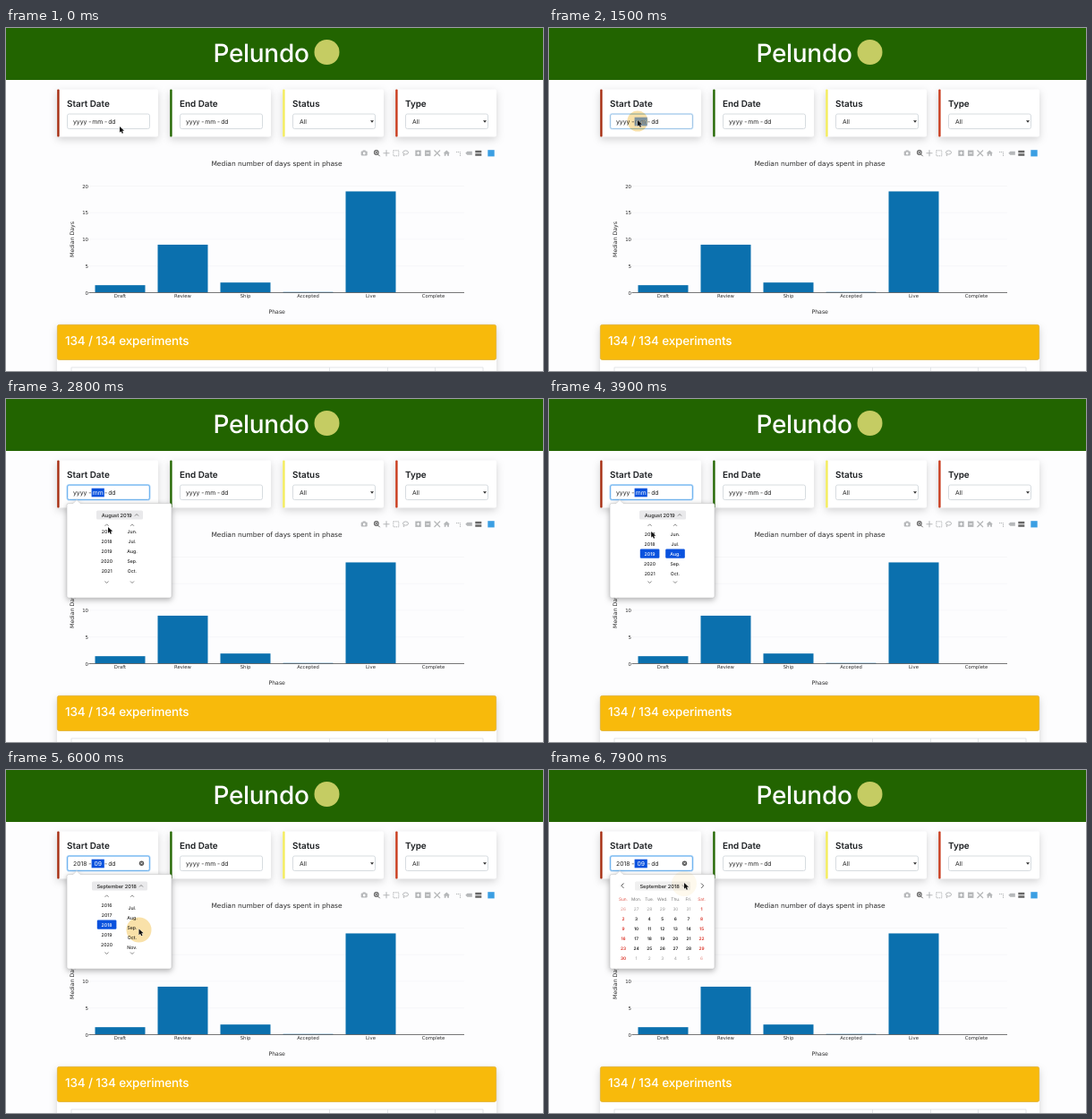
Write an HTML page that moves like this. It is 600 by 383 pixels and loops after 8 s.

```html
<!DOCTYPE html>
<html lang="en">
<head>
<meta charset="utf-8">
<title>Experiment dashboard</title>
<style>
html, body { margin: 0; width: 100%; height: 100%; overflow: hidden; background: #fdfdfe; }
svg { display: block; text-rendering: geometricPrecision; }
text { font-family: Inter, Roboto, sans-serif; white-space: pre; }
.plot text { font-family: "DejaVu Sans", Verdana, sans-serif; }
.card { filter: drop-shadow(0 3px 4px rgba(0,0,0,.17)); }
.popup { filter: drop-shadow(0 2px 3px rgba(0,0,0,.3)); }
</style>
</head>
<body>
<svg width="600" height="383" viewBox="0 0 600 383">
  <g id="page"></g>
  <g id="live"></g>
</svg>
<script>
const LOOP = 8000;
const BLUE = '#0a52de';
const $ = id => document.getElementById(id);

const rect = (x, y, w, h, fill, more = '') =>
  `<rect x="${x}" y="${y}" width="${w}" height="${h}" fill="${fill}" ${more}/>`;
const line = (d, stroke, width = 1, more = '') =>
  `<path d="${d}" fill="none" stroke="${stroke}" stroke-width="${width}" ${more}/>`;
const text = (s, x, y, size, fill = '#222', more = '') =>
  `<text x="${x}" y="${y}" font-size="${size}" fill="${fill}" ${more}>${s}</text>`;
const MID = 'text-anchor="middle"';
const END = 'text-anchor="end"';

function dateText(x, year) {
  return text(year, x, 106.8, 6.8) + text('-', x + 17.2, 106.8, 6.8) +
    text('mm', x + 21.2, 106.8, 6.8) +
    text('-', x + 35, 106.8, 6.8) + text('dd', x + 39.2, 106.8, 6.8);
}

function filterCard(label, color, i) {
  const x = 57 + i * 126;
  let s = `<g class="card">${rect(x, 68.5, 113, 53, '#fff', 'rx="2"')}</g>` +
    rect(x + .2, 68.5, 2.4, 53, color, 'rx="1"') +
    text(label, x + 11, 88, 9.9, '#1b1e21', 'font-weight="600"') +
    rect(x + 11.5, 96, 92, 16.5, '#fff', 'rx="2" stroke="#cdd3d9" stroke-width=".8"');
  if (i === 1) s += dateText(x + 18, 'yyyy');
  if (i > 1) s += text('All', x + 19, 106.8, 6.8) +
    `<path d="M${x + 98} 103.2h4l-2 2.6z" fill="#333"/>`;
  return s;
}

function toolbar() {
  const c = '#b5b7b9', dark = '#666';
  return rect(396.7, 137.5, 7, 5, c, 'rx="1"') + rect(398.7, 136.5, 3, 2, c) +
    '<circle cx="400.2" cy="140" r="1.4" fill="#fff"/>' +
    `<circle cx="413.8" cy="139" r="2.3" fill="none" stroke="${dark}" stroke-width="1.2"/>` +
    line('M415.5 141l2.2 2.2M412.6 139h2.4M413.8 137.8v2.4', dark) +
    line('M421.5 139.8h7M425 136.3v7', c, 1.1) +
    rect(432.8, 136.8, 6, 6, 'none', `stroke="${c}" stroke-dasharray="1.5 .8"`) +
    `<ellipse cx="446.5" cy="139" rx="3" ry="2.1" fill="none" stroke="${c}"/>` +
    line('M444.5 140.5q-1 1.5 .5 2.5', c) +
    rect(457.3, 136.5, 6.4, 6.4, c) + line('M458.8 139.7h3.4M460.5 138v3.4', '#fff') +
    rect(468, 136.5, 6.4, 6.4, c) + line('M469.5 139.7h3.4', '#fff') +
    line('M478.5 136.5l6.5 6.5M485 136.5l-6.5 6.5', c, 1.2) +
    `<path d="M488.7 139.8l3.6-3.4 3.6 3.4h-1v3h-1.8v-2h-1.6v2h-1.8v-3z" fill="${c}"/>` +
    line('M503 138.5h4.5v4.5', c, 1, 'stroke-dasharray="1.3 .7"') +
    `<path d="M513.3 139.8l2-2h5.5v4h-5.5z" fill="${c}"/>` +
    rect(524.3, 136.8, 7, 2.5, dark) + rect(524.3, 140.3, 7, 2.5, dark) +
    rect(538.3, 136.2, 7.4, 7.2, '#3b9fe3');
}

function chart() {
  const base = 295.5, unit = 5.95;
  let s = text('Median number of days spent in phase', 302.5, 154.3, 7.5, '#2a2a2a', MID);
  for (let v = 0; v <= 20; v += 5) {
    const y = base - v * unit;
    if (v) s += line(`M92 ${y}H512`, '#f4f4f5', .6);
    s += text(v, 92, y + 2, 5.4, '#2a2a2a', END);
  }
  const phases = { Draft: 1.4, Review: 9, Ship: 1.9, Accepted: .12, Live: 19, Complete: 0 };
  Object.entries(phases).forEach(([name, days], i) => {
    const x = 127.5 + i * 70;
    s += rect(x - 28, base - days * unit, 56, days * unit, '#0b70ae') +
      text(name, x, 301.4, 5.3, '#2a2a2a', MID);
  });
  s += line(`M92.5 ${base}H512`, '#555', .8) + text('Phase', 302.7, 318.8, 6.2, '#2a2a2a', MID) +
    text('Median Days', 0, 0, 6.2, '#2a2a2a', `${MID} transform="translate(76 236) rotate(-90)"`);
  return `<g class="plot">${s}</g>`;
}

function page() {
  const cards = [['Start Date', '#a52c10'], ['End Date', '#226600'],
    ['Status', '#f3ec5c'], ['Type', '#c93c1d']];
  return rect(0, 0, 600, 383, '#fdfdfe') + rect(0, 0, 600, 58, '#226400') +
    text('Pelundo', 285, 38, 28, '#fff', MID + ' font-weight="500" letter-spacing="-.3"') +
    '<circle cx="358.5" cy="27" r="14" fill="#c5cc63"/>' +
    cards.map(([label, color], i) => filterCard(label, color, i)).join('') +
    toolbar() + chart() +
    `<g class="card">${rect(57, 331.5, 491, 60, '#fff', 'rx="2"')}</g>` +
    rect(57.4, 331.4, 490.2, 39, '#f8ba0b', 'rx="2" stroke="#dfae2c" stroke-width=".8"') +
    text('134 / 134 experiments', 66, 354.2, 13.5, '#fff', 'font-weight="500" letter-spacing="-.15"') +
    line('M73 384V379H533V384M361.5 379v5M426.5 379v5M479.5 379v5', '#dcdfe2', .8);
}

// Cursor keys: time, x, y
const path = [[0, 127, 110], [300, 127, 110], [1200, 99, 103], [1750, 99, 103],
  [2250, 124, 129], [2450, 124, 129], [2800, 114, 143], [3500, 114, 143],
  [4400, 114.5, 155], [5000, 114.5, 155], [5650, 148.5, 177.5], [6250, 148.5, 177.5],
  [7200, 150.5, 125.5], [LOOP, 151, 126]];
const clicks = [1400, 2350, 4700, 5800, 7500];

const clamp = v => Math.max(0, Math.min(1, v));
const ramp = (t, a, b) => clamp((t - a) / (b - a));
const smooth = k => k * k * (3 - 2 * k);

function cursorAt(t) {
  const i = path.findIndex(p => p[0] > t);
  const [t0, x0, y0] = path[i - 1], [t1, x1, y1] = path[i];
  const k = smooth(ramp(t, t0, t1));
  return [x0 + (x1 - x0) * k, y0 + (y1 - y0) * k];
}

function pointer(t) {
  const [x, y] = cursorAt(t);
  let s = '';
  for (const c of clicks) {
    if (t < c || t > c + 450) continue;
    const r = 9 + 5 * ramp(t, c, c + 200);
    s += `<circle cx="${x}" cy="${y + 1}" r="${r}" fill="#f8dc9a" ` +
      `opacity="${.85 * (1 - ramp(t, c + 220, c + 450))}" style="mix-blend-mode:multiply"/>`;
  }
  return s + `<path transform="translate(${x} ${y})" d="M0 0v6.8l1.6-1.5 1.1 2.5 1.3-.6-1.1-2.4h2.2z" ` +
    'fill="#111" stroke="#fff" stroke-width=".6" paint-order="stroke"/>';
}

const monthName = (m, style) => new Date(2018, m, 1).toLocaleString('en-US', { month: style });

function heading(year, month, open) {
  const label = `${monthName(month, 'long')} ${year}`;
  const half = month === 8 ? 31 : 26;
  const x = 127 + half - 7;
  return rect(127 - half, 124.4, half * 2, 10, open ? '#e9e9eb' : '#f0f0f0', 'rx="1.5"') +
    text(label, 123.7, 131.5, 5.7, '#222', MID + ' font-weight="500"') +
    line(open ? `M${x - 2} 130.5l2-2 2 2` : `M${x - 2} 128.5l2 2 2-2`, '#666', .8);
}

function calendar(year, month) {
  let s = line('M83.5 126.5l-2.7 2.7 2.7 2.7M170 126.5l2.7 2.7-2.7 2.7', '#444', .9);
  const first = new Date(year, month, 1).getDay();
  for (let i = 0; i < 49; i++) {
    const col = i % 7, row = Math.floor(i / 7);
    const x = 83 + col * 14.6, y = 145.6 + row * 11.1;
    const red = col % 6 === 0;
    if (!row) {
      const day = ['Sun', 'Mon', 'Tue', 'Wed', 'Thu', 'Fri', 'Sat'][col];
      s += text(day + '.', x, y, 4.8, red ? '#e2574c' : '#777', MID);
      continue;
    }
    const date = new Date(year, month, i - 6 - first);
    const inside = date.getMonth() === month;
    const fill = red ? (inside ? '#d9281c' : '#e58a82') : (inside ? '#222' : '#999');
    s += text(date.getDate(), x, y, 4.8, fill, `${MID} font-weight="${inside ? 600 : 400}"`);
  }
  return s;
}

function spinner(x, labels, shift) {
  const settled = Math.abs(shift) < .1;
  let s = line(`M${x - 2} 141.8l2-2 2 2M${x - 2} 203.5l2 2 2-2`, '#777', .9);
  if (settled) s += rect(x - 10.8, 167.5, 21.6, 10.3, BLUE, 'rx="1.2"');
  labels.forEach((label, i) => {
    s += text(label, x, 152.9 + i * 11 + shift, 5.2,
      settled && i === 2 ? '#fff' : '#222', MID + ' font-weight="500"');
  });
  return s;
}

function picker(t, year, month) {
  const near = [-2, -1, 0, 1, 2];
  const lag = t < 4000 ? -9 * (1 - ramp(t, 2650, 2875)) : -9 * (1 - ramp(t, 4750, 4975));
  const years = near.map(d => year + d);
  if (t > 4750 && t < 4950) years[0] = year;
  const months = near.map(d => monthName(month + d, 'short') + '.');
  const monthLag = month === 8 ? 11 * (1 - ramp(t, 5850, 6070)) : lag;
  return spinner(112.6, years, lag) + spinner(141, months, monthLag);
}

function popup(t, year, month) {
  const choosing = t >= 2650 && t < 7700;
  return '<path class="popup" d="M70 116.6h5l4-4 4 4h100q2 0 2 2v101.5q0 2-2 2h-113q-2 0-2-2v-101.5q0-2 2-2z" ' +
    'fill="#fff" stroke="#c4c4c6" stroke-width=".6"/>' +
    heading(year, month, choosing) +
    (choosing ? picker(t, year, month) : calendar(year, month));
}

function field(t, year, month) {
  const focus = ramp(t, 1400, 1600), dated = t >= 4750;
  let s = dateText(75, dated ? year : 'yyyy');
  if (!focus) return s;
  s += `<g opacity="${focus}">` +
    rect(68.5, 96, 92, 16.5, 'none', 'rx="2" stroke="#c3e0fb" stroke-width="2.2"') +
    rect(68.5, 96, 92, 16.5, 'none', 'rx="2" stroke="#69b0ee" stroke-width=".9"') +
    rect(95.6, 99.7, 14.2, 9.6, BLUE) +
    text(month === 8 ? '09' : 'mm', 102.7, 106.8, 6.8, '#fff', MID) + '</g>';
  if (dated) s += '<circle cx="151.5" cy="104.2" r="2.7" fill="#555"/>' +
    line('M150.4 103.1l2.2 2.2M152.6 103.1l-2.2 2.2', '#fff', .8);
  return s;
}

function draw(now) {
  const t = now % LOOP;
  const year = t < 4750 ? 2019 : 2018;
  const month = t < 5850 ? 7 : 8;
  $('live').innerHTML = field(t, year, month) +
    (t >= 1700 ? popup(t, year, month) : '') + pointer(t);
  requestAnimationFrame(draw);
}

$('page').innerHTML = page();
requestAnimationFrame(draw);
</script>
</body>
</html>
```
